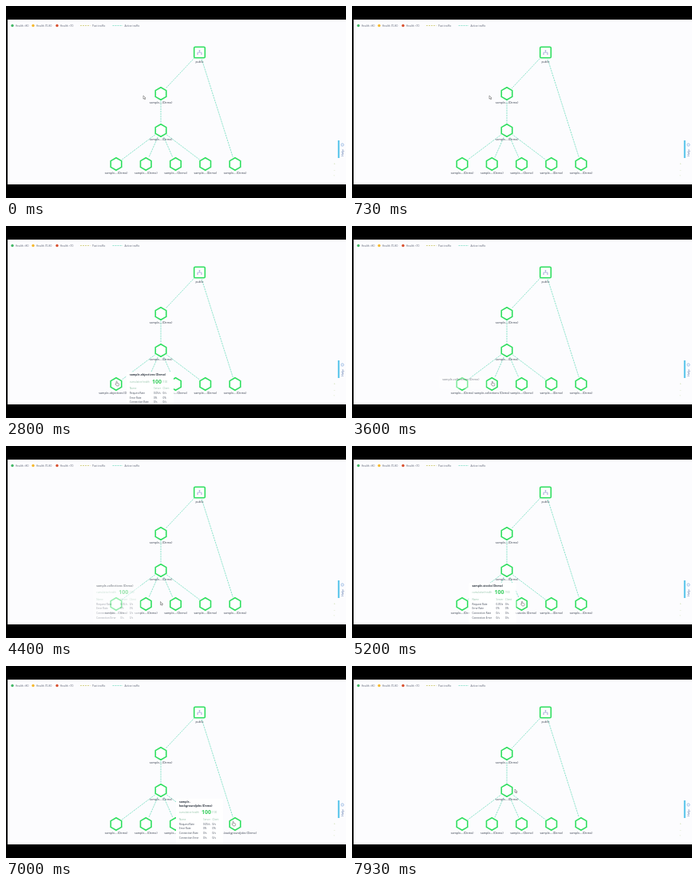
Animation of 426x240 px, one loop 8000 ms. Source, as an HTML page:

```html
<!DOCTYPE html>
<html lang="en">
<head>
<meta charset="utf-8">
<title>Service map</title>
<style>
  html, body { margin: 0; width: 100%; height: 100%; overflow: hidden; background: #000; }
  svg { display: block; width: 100vw; height: 100vh; }
  text { font-family: "Open Sans", "Noto Sans", sans-serif; font-size: 3.3px; fill: #5f6577; }
  .label { font-size: 3.6px; fill: #343c4c; text-anchor: middle; }
  .node { fill: #fff; stroke: #30df60; stroke-width: 1.6; stroke-linejoin: round; }
  .edge { stroke: #7ddfc4; stroke-width: .85; stroke-dasharray: 2.2 .9; }
  .title { font-size: 3.5px; font-weight: 700; fill: #2d3540; }
  .score { font-size: 7px; font-weight: 700; fill: #39cf5f; }
  .faint { fill: #93c3a8; font-size: 3px; }
  .row { font-size: 3.1px; fill: #434b5a; }
  .zoom { font-size: 4px; fill: #b9cf8c; }
  .help { font-size: 4px; fill: #4c6ca6; }
</style>
</head>
<body>
<svg viewBox="0 0 426 240">
  <clipPath id="page"><rect x="2" y="17" width="424" height="206"/></clipPath>
  <g id="scene" clip-path="url(#page)">
    <rect x="2" y="17" width="424" height="206" fill="#fcfcfe"/>
  </g>
</svg>
<script>
const LOOP = 8000, STEP = 200 / 3, TRAVEL = 350, FADE = 200, LOADING = 170;
const PAGE_BOTTOM = 223, TIP_WIDTH = 59, LINE = 5;
const SHORT = 'sample-…(Demo)';
const scene = document.getElementById('scene');

function add(parent, tag, attrs, content) {
  const el = document.createElementNS('http://www.w3.org/2000/svg', tag);
  for (const key in attrs) el.setAttribute(key, attrs[key]);
  if (content) el.textContent = content;
  parent.append(el);
  return el;
}
const text = (parent, x, y, content, cls = '') => add(parent, 'text', { x, y, class: cls }, content);
const show = (el, visible) => el.setAttribute('visibility', visible ? 'visible' : 'hidden');
const clamp = v => Math.max(0, Math.min(1, v));

// Legend
[['Health >80', '#45b868'], ['Health 70-80', '#f5b82e'], ['Health <70', '#d8502f']].forEach(([name, fill], i) => {
  const x = 8 + 28 * i - (i === 1 ? 2 : 0);
  add(scene, 'circle', { cx: x, cy: 24.5, r: 1.7, fill });
  text(scene, x + 3.7, 25.7, name);
});
[['Past traffic', '#cfcb70'], ['Active traffic', '#7ddfc4']].forEach(([name, stroke], i) => {
  const x = 93 + 40.5 * i;
  add(scene, 'path', { d: `M${x} 24.5h12.5`, stroke, 'stroke-width': .8, 'stroke-dasharray': '2 1' });
  text(scene, x + 15, 25.7, name);
});

// Service graph
const root = { x: 242.5, y: 58 }, gateway = { x: 194, y: 109.5 }, hub = { x: 194, y: 155.5 };
const leaves = Array.from({ length: 5 }, (_, i) => ({ x: 138 + 37.25 * i, y: 197.5 }));

const links = [[root, gateway], [gateway, hub], [root, leaves[4]], ...leaves.slice(0, 4).map(leaf => [hub, leaf])];
const edges = links.map(([a, b]) => {
  const dx = b.x - a.x, dy = b.y - a.y, trim = 9 / Math.hypot(dx, dy);
  return add(scene, 'line', {
    class: 'edge', x1: a.x + dx * trim, y1: a.y + dy * trim, x2: b.x - dx * trim, y2: b.y - dy * trim
  });
});

const hexagon = Array.from({ length: 6 }, (_, i) => {
  const a = Math.PI / 3 * (i + .5);
  return `${7.8 * Math.cos(a)},${7.8 * Math.sin(a)}`;
}).join(' ');
[gateway, hub, ...leaves].forEach(node => {
  add(scene, 'polygon', { points: hexagon, class: 'node', transform: `translate(${node.x} ${node.y})` });
  node.label = text(scene, node.x, node.y + 12.9, SHORT, 'label');
});
add(scene, 'rect', { x: root.x - 6.8, y: root.y - 6.8, width: 13.6, height: 13.6, rx: 1.3, class: 'node' });
add(scene, 'path', {
  d: 'M242.5 55.5v2.5M240 60v-2h5v2M241.6 55.5h1.8M239.2 60.3h1.8M244 60.3h1.8',
  fill: 'none', stroke: '#9aa0d4', 'stroke-width': .7
});
text(scene, root.x, root.y + 12.8, 'public', 'label');

// Side tab and zoom buttons
add(scene, 'rect', { x: 415.8, y: 168, width: 2, height: 22, fill: '#55c4ea' });
add(scene, 'circle', { cx: 421.5, cy: 173.5, r: 1.6, fill: 'none', stroke: '#7aa5dc', 'stroke-width': .7 });
add(scene, 'text', { transform: 'translate(423 188) rotate(-90)', class: 'help' }, 'Help');
['+', '–', '▫'].forEach((sign, i) => text(scene, 410.5, 198.3 + 7.5 * i, sign, 'zoom'));

// Pointer stops by arrival time; the ones with a node open its tooltip
const leafStop = (i, time, ...title) =>
  ({ time, x: leaves[i].x - 3 * (i > 2), y: leaves[i].y - 3, node: leaves[i], title, onRight: i === 0 });
const stops = [
  { time: 0, x: 172, y: 112 },
  { time: 1250, x: 192, y: 149 },
  leafStop(0, 2250, 'sample-objectives (Demo)'),
  leafStop(1, 3600, 'sample-collections (Demo)'),
  leafStop(2, 4650, 'sample-stocks (Demo)'),
  leafStop(3, 5900, 'sample-catalogs (Demo)'),
  leafStop(4, 6700, 'sample-', 'backgroundjobs (Demo)'),
  { time: 7750, x: 204, y: 154 }
];
stops.forEach((stop, i) => { stop.leave = i + 1 < stops.length ? stops[i + 1].time - TRAVEL : LOOP; });

const visits = stops.filter(stop => stop.node);
visits.forEach(visit => {
  const { node, title } = visit, extra = LINE * (title.length - 1), pad = 4;
  visit.height = 52 + extra;
  visit.tipX = visit.onRight ? node.x + 13 : node.x - 66 - 1.6 * extra;
  visit.tipY = visit.onRight ? node.y - 15 : PAGE_BOTTOM - visit.height;
  visit.tip = add(scene, 'g', {});
  visit.back = add(visit.tip, 'rect', { width: TIP_WIDTH, rx: 1, fill: '#fff' });
  title.forEach((line, i) => text(visit.tip, pad, 4.8 + LINE * i, line, 'title'));

  const body = visit.body = add(visit.tip, 'g', { transform: `translate(0 ${extra})` });
  text(body, pad, 13, 'cumulative health', 'faint');
  text(body, 32, 14.2, '100', 'score');
  text(body, 45, 13, '/100', 'faint');
  const rate = name => [name, '0/s', '0/s'];
  [['Name', 'Server', 'Client'], ['Request Rate', '0.05/s', '0/s'], ['Error Rate', '0%', '0%'],
    rate('Connection Rate'), rate('Connection Error')].forEach((cells, row) => {
    cells.forEach((cell, col) =>
      text(body, col ? 22.5 + 11.5 * col : pad, 21.8 + 5.7 * row, cell, row ? 'row' : 'faint'));
  });
});

const pointer = add(scene, 'g', { fill: '#fff', stroke: '#555', 'stroke-width': .5, 'stroke-linejoin': 'round' });
const arrow = add(pointer, 'path', { d: 'M0 0v4.2l1-.9.8 1.6.8-.4-.8-1.5h1.3z' });
const hand = add(pointer, 'path', { d: 'M0 0q.7-.8 1.2 0v2l2 .4q.8.3.5 1.4l-.6 1.6H.6L-1 3.2q0-.8 1-.2z' });

function draw(t) {
  edges.forEach(edge => edge.setAttribute('stroke-dashoffset', -t * .012));

  const i = stops.findLastIndex(stop => t >= stop.time);
  const from = stops[i], to = stops[i + 1] || from;
  const ease = 1 - (1 - clamp((t - from.leave) / TRAVEL)) ** 2;
  const x = from.x + (to.x - from.x) * ease, y = from.y + (to.y - from.y) * ease;
  pointer.setAttribute('transform', `translate(${x} ${y})`);

  const hovered = t < from.leave && from.node;
  show(hand, hovered);
  show(arrow, !hovered);

  visits.forEach(visit => {
    const age = t - visit.time, loading = age < LOADING;
    const opacity = age < 0 ? 0 : Math.min(clamp(.4 + age / FADE), clamp(1 - (t - visit.leave) / FADE));
    visit.node.label.textContent = hovered === visit.node ? visit.title.join('') : SHORT;
    visit.tip.setAttribute('opacity', opacity);
    visit.tip.setAttribute('transform', `translate(${visit.tipX} ${loading ? 188.3 : visit.tipY})`);
    visit.back.setAttribute('height', loading ? 15 : visit.height);
    show(visit.body, !loading);
  });
}

function tick() {
  draw(Math.floor(performance.now() % LOOP / STEP) * STEP);
  requestAnimationFrame(tick);
}
tick();
</script>
</body>
</html>
```
